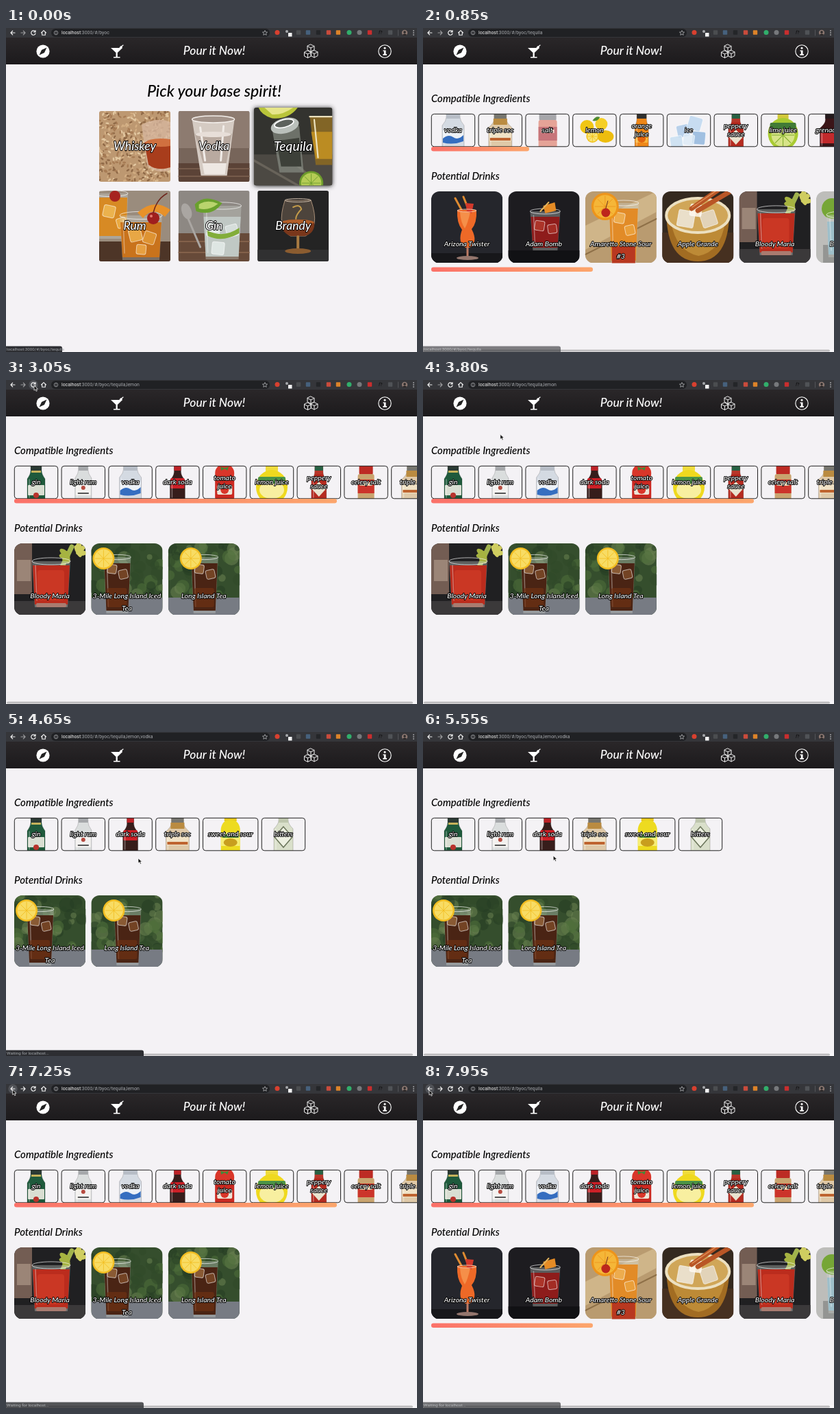
An HTML page for the animation above (8 s loop, 600 px wide and 472 px high).

```html
<!DOCTYPE html>
<html lang="en">
<head>
<meta charset="utf-8">
<title>Cocktail picker</title>
<style>
  html, body { margin: 0; width: 100%; height: 100%; overflow: hidden; background: #f4f2f5; }
  svg { display: block; }
  #stage { width: 100vw; height: 100vh; }
  .script { font-family: Lato, sans-serif; font-style: italic; font-weight: 500; }
  .label { fill: #fff; stroke: #000; stroke-width: 1.8px; paint-order: stroke; stroke-linejoin: round; text-anchor: middle; }
  .ui { font-family: Roboto, sans-serif; }
</style>
</head>
<body>
<svg id="stage" viewBox="0 0 600 472" preserveAspectRatio="none"></svg>
<script>
const LOOP = 8000;
let seed = 7;
const rnd = (a = 0, b = 1) => {
  seed = (seed * 16807) % 2147483647;
  return a + (b - a) * seed / 2147483647;
};
const many = (n, make) => Array.from({ length: n }, (_, i) => make(i)).join('');

// Drawing helpers
const rect = (x, y, w, h, fill, r = 0, more = '') => `<rect x="${x}" y="${y}" width="${w}" height="${h}" rx="${r}" fill="${fill}" ${more}/>`;
const disc = (x, y, r, fill, more = '') => `<circle cx="${x}" cy="${y}" r="${r}" fill="${fill}" ${more}/>`;
const oval = (x, y, rx, ry, fill, more = '') => `<ellipse cx="${x}" cy="${y}" rx="${rx}" ry="${ry}" fill="${fill}" ${more}/>`;
const path = (d, fill, more = '') => `<path d="${d}" fill="${fill}" ${more}/>`;
const line = (d, color, w = 1, more = '') => path(d, 'none', `stroke="${color}" stroke-width="${w}" stroke-linecap="round" stroke-linejoin="round" ${more}`);
const text = (x, y, size, str, cls, more = '') => `<text x="${x}" y="${y}" font-size="${size}" class="${cls}" ${more}>${str}</text>`;
const move = (x, y, inner, more = '') => `<g transform="translate(${x} ${y}) ${more}">${inner}</g>`;
const group = (id, inner) => `<g id="${id}">${inner}</g>`;
const grad = (id, a, b, horizontal) => `<linearGradient id="${id}" x2="${horizontal ? 1 : 0}" y2="${horizontal ? 0 : 1}"><stop stop-color="${a}"/><stop offset="1" stop-color="${b}"/></linearGradient>`;
const clip = (id, w, h, r) => `<clipPath id="${id}">${rect(0, 0, w, h, '#000', r)}</clipPath>`;

const citrus = (x, y, r, rind, flesh) => disc(x, y, r, rind) + disc(x, y, r * .84, flesh) +
  many(4, i => line(`M${x - r * .75} ${y}h${r * 1.5}`, rind, .8, `transform="rotate(${i * 45} ${x} ${y})"`));
const cube = (x, y, s, fill, turn = 0) => rect(x, y, s, s, fill, 2.5, `transform="rotate(${turn} ${x} ${y})" stroke="#ffffff" stroke-opacity=".6" fill-opacity=".8"`);
const tumbler = (x, y, w, h, fill, level = 10, inset = 3) =>
  path(`M${x} ${y}h${w}l${-inset} ${h}h${2 * inset - w}z`, '#cfd3cf', 'fill-opacity=".35"') +
  path(`M${x + 1} ${y + level}h${w - 2}l${1 - inset} ${h - level - 4}h${2 * inset - w}z`, fill) +
  oval(x + w / 2, y, w / 2, w / 11, 'none', 'stroke="#fff" stroke-opacity=".65"') +
  line(`M${x + 5} ${y + 6}l2 ${h - 16}`, '#fff', 1.5, 'stroke-opacity=".35"');

// Base spirits, 104 x 103
const spirits = {
  Whiskey: () => rect(0, 0, 104, 104, '#bd9871') +
    many(430, () => {
      const x = rnd(0, 104), y = rnd(0, 104);
      return oval(x, y, 2.6, 1.3, ['#e2c7a0', '#a77c55', '#d2ad82', '#8f6947'][Math.floor(rnd(0, 4))], `transform="rotate(${rnd(0, 180)} ${x} ${y})"`);
    }) +
    path('M62 20Q84 8 104 16V86Q84 92 70 80Z', '#d9b9a2', 'fill-opacity=".75"') +
    path('M66 46Q86 38 104 46V82Q84 88 72 78Z', '#a83d1c') + oval(90, 46, 22, 6, '#d0703f'),
  Vodka: () => rect(0, 0, 104, 104, '#77655a') + rect(0, 0, 104, 54, '#8d7b70') + rect(0, 76, 104, 28, '#5b4337') +
    line('M0 84h104M0 95h104', '#765b4b', 2) +
    path('M20 12H82L71 94H33Z', '#d5cbc3') + path('M24 33H78L70 76H36Z', '#b9aaa0') + path('M35 76H70L68 92H38Z', '#eee8e3') +
    oval(51, 12, 31, 5, '#a3948b', 'stroke="#f4efeb" stroke-width="1.5"') + line('M32 24l7 48M66 22l-4 50', '#f1ece8', 3) + oval(51, 34, 26, 4, '#e7ded8'),
  Tequila: () => rect(0, 0, 104, 104, '#33332f') + rect(0, 62, 104, 42, '#4c4943') + line('M0 70L60 104M40 62l50 42', '#68635a', 3) +
    path('M6 0H58Q46 16 24 14Q10 10 6 0Z', '#b9c43a') + path('M14 0H52Q38 10 24 9Z', '#e6e58a') +
    path('M24 28L60 24L66 86H34Z', '#8d9289', 'fill-opacity=".65"') + path('M30 44L60 40L63 78H36Z', '#3d4039') +
    oval(41, 24, 19, 10, '#bac0bb', 'transform="rotate(-14 41 24)"') + oval(40, 21, 13, 5, '#5d625d', 'stroke="#fff" stroke-width="1.5" transform="rotate(-14 40 21)"') +
    path('M74 12H104V76H82Z', '#826526') + path('M76 32H104V68H82Z', '#bb8c22') + line('M74 12H104M80 16l5 50', '#ece2bf', 2) +
    citrus(76, 100, 16, '#6d9b2c', '#b5cc55'),
  Rum: () => rect(0, 0, 104, 104, '#9a8c7d') + rect(0, 74, 104, 30, '#4d3527') +
    tumbler(-8, 4, 50, 66, '#d78a24', 6, 2) + cube(8, 20, 17, '#f0bd58', 12) + cube(24, 42, 14, '#efb246', -16) +
    tumbler(30, 36, 62, 65, '#c9731c', 10, 4) + cube(42, 58, 18, '#f1b44f', -14) + cube(68, 58, 17, '#e49b37', 18) + cube(55, 78, 14, '#efac4a', 5) +
    path('M56 32Q80 10 104 28L96 38Q78 22 64 40Z', '#e89129') + disc(23, 8, 8, '#a62320') + disc(79, 40, 9, '#9f1f1e') + line('M79 32Q84 12 99 4', '#6f251d', 1.5) + disc(76, 37, 2, '#e57b6e'),
  Gin: () => rect(0, 0, 104, 104, '#8d8883') + rect(0, 62, 104, 42, '#674a39') + line('M0 74h104M0 90h104', '#83614a', 2) +
    oval(12, 30, 7, 12, '#aaa6a2', 'transform="rotate(-20 12 30)"') + line('M14 40L32 82', '#aaa6a2', 3) +
    tumbler(36, 22, 56, 78, '#c0c8c4', 16, 4) + cube(44, 48, 18, '#eef3f1', 10) + cube(68, 52, 17, '#dce4e1', -14) + cube(50, 74, 18, '#e7eeeb', 6) +
    path('M24 20Q38 4 64 18Q50 38 26 30Z', '#69a02d') + path('M30 20Q42 12 58 19Q44 30 30 26Z', '#b9d46d') + path('M42 58Q66 70 89 54V62Q64 76 43 66Z', '#82ad3a'),
  Brandy: () => rect(0, 0, 104, 104, '#242424') + rect(0, 86, 104, 18, '#303031') +
    path('M40 14H78Q92 54 70 66H48Q27 54 40 14Z', '#85705d', 'fill-opacity=".42" stroke="#a68d76"') +
    path('M34 46H83Q84 62 69 66H48Q34 60 34 46Z', '#79371b') + oval(58.5, 46, 24, 4, '#b05e2a') +
    line('M59 67V84', '#a97b42', 4) + oval(59, 88, 19, 4, '#8b5c30') + oval(59, 14, 19, 2.5, 'none', 'stroke="#c6b5a4"') + line('M52 24q10-5 12 3q-8 8-8 14', '#c29a4a', 2),
};

// Ingredients, 64 x 48
const bottle = (neck, body, shoulder, fill, cap = '', label = '', labelY = 28) =>
  path(`M${32 - neck} -2H${32 + neck}V${shoulder - 8}Q${32 + neck} ${shoulder - 3} ${32 + body} ${shoulder + 4}V50H${32 - body}V${shoulder + 4}Q${32 - neck} ${shoulder - 3} ${32 - neck} ${shoulder - 8}Z`, fill, 'stroke="#000" stroke-opacity=".18"') +
  (cap && rect(32 - neck, 0, neck * 2, 7, cap)) + (label && rect(33 - body, labelY, body * 2 - 2, 15, label, 1)) +
  line(`M${35 - body} ${shoulder + 5}V46`, '#fff', 1.5, 'stroke-opacity=".35"');
const goods = {
  'vodka': () => bottle(10, 16, 13, '#d4dae2', '#b7bdc6', '#edf1f6', 24) + path('M17 36q8-7 15-2t15-3v9q-15 6-30 2z', '#356ec0'),
  'triple sec': () => bottle(9, 17, 16, '#dfc9a8', '#77766f', '#f0e2c6', 25) + rect(22, 7, 20, 9, '#ba8b41') + rect(17, 35, 30, 4, '#be6430'),
  'salt': () => rect(20, -2, 25, 12, '#a6a6aa', 2) + rect(19, 9, 27, 42, '#e5a397', 3) + rect(19, 19, 27, 20, '#c7757a') + rect(23, 23, 19, 5, '#f3d7cd'),
  'lemon': () => disc(21, 19, 10, '#f0c615') + disc(42, 15, 9, '#f5cf26') + oval(48, 33, 12, 9, '#edbd0e') + citrus(29, 33, 9, '#f1bf12', '#f8e478') + path('M29 10q5-8 11-5q-4 7-11 5', '#4e8a31'),
  'orange juice': () => bottle(7, 10, 15, '#ef8718', '#303030', '#f7b33a', 27) + disc(32, 36, 6, '#e2650f'),
  'ice': () => cube(13, 18, 18, '#a9c9e8', -12) + cube(34, 2, 20, '#bcd8f0', 16) + cube(38, 25, 19, '#8db5dc', 5) + cube(4, 34, 18, '#c6dff2', -8) + cube(25, 29, 16, '#dcebf7', 8),
  'peppery sauce': () => bottle(6, 11, 17, '#b52b20', '#286143') + rect(26, 7, 12, 5, '#b7372a') + path('M32 23l10 11-10 11-10-11z', '#e9e3cf'),
  'lime juice': () => rect(24, -2, 16, 11, '#d2c83a', 2) + oval(32, 29, 22, 23, '#a9cb32') + disc(32, 31, 17, '#d7e488') + many(4, i => line('M16 31h32', '#7fab28', 1, `transform="rotate(${i * 45} 32 31)"`)) + rect(13, 13, 38, 9, '#417b36', 2),
  'grenadine': () => bottle(7, 15, 17, '#3b1518', '#241a1d', '#c22a2c'),
  'gin': () => bottle(8, 13, 15, '#1f5a3c', '#2b3a34', '#d9ded2', 28) + disc(32, 43, 4, '#b8332c') + rect(25, 7, 14, 3, '#c5b25b'),
  'light rum': () => bottle(7, 12, 14, '#dadddd', '#a6a8ab', '#f3f1ef', 28) + disc(32, 32, 3, '#b64a3f') + rect(24, 39, 16, 2, '#555'),
  'dark soda': () => bottle(5, 11, 17, '#371d1b', '#bc2227', '#cc2027', 18),
  'tomato juice': () => oval(32, 11, 14, 14, '#d9362a') + rect(18, 17, 28, 34, '#cb2a22', 5) + rect(21, 28, 22, 14, '#ece4d6', 2) + disc(32, 35, 6, '#d9362a') + path('M26 1q6 4 12 0l-2 6-4-3-5 3z', '#428a38'),
  'lemon juice': () => rect(23, -2, 18, 11, '#f0dc3c', 2) + oval(32, 31, 23, 25, '#efd91f') + oval(32, 35, 18, 13, '#f8efa0') + rect(12, 16, 40, 10, '#4c9347', 2),
  'celery salt': () => rect(22, -2, 20, 15, '#bd2b24', 2) + rect(20, 12, 24, 40, '#c9a46f', 3) + rect(20, 20, 24, 20, '#cc342b') + rect(23, 24, 18, 5, '#f3e2c0'),
  'sweet and sour': () => move(8.5, 0, rect(23, -2, 18, 7, '#e8c91d') + path('M18 52V16Q20 3 32 3T46 16V52Z', '#eddb20') + rect(18, 21, 28, 20, '#f6ed74') + oval(32, 36, 10, 6, '#c89e1e') + rect(20, 24, 24, 5, '#4b8c3f')),
  'bitters': () => bottle(7, 14, 12, '#d9dfca', '#bec6ad') + path('M32 13l13 15-13 15-13-15z', '#edf0e1', 'stroke="#6c765c" stroke-width="1.5"'),
};

// Drinks, 104 x 104
const icedTea = shift => rect(0, 0, 104, 104, '#354e2d') +
  many(45, () => disc(rnd(0, 104), rnd(0, 80), rnd(4, 11), ['#4f6f3b', '#263c24', '#6a8150', '#314929'][Math.floor(rnd(0, 4))], 'fill-opacity=".55"')) +
  rect(0, 79, 104, 25, '#777b83') +
  move(shift, 0, tumbler(18, 20, 40, 82, '#4a2414', 9, 4) + cube(25, 30, 13, '#99683d', 8) + cube(39, 40, 13, '#7d4b28', -12) + rect(23, 65, 29, 28, '#6e3113', 3, 'fill-opacity=".7"') + citrus(18, 22, 16, '#f2bd20', '#f8dc64'));
const drinks = {
  'Arizona Twister': () => rect(0, 0, 104, 104, '#25262c') + rect(0, 90, 104, 14, '#17171a') +
    line('M47 32L35 10M56 30L47 8', '#df8b31', 3) + path('M38 27H66Q67 46 59 55Q69 74 56 82H50Q38 74 45 56Q37 46 38 27Z', '#ee6927') + path('M42 30H57Q53 48 49 54Q43 45 42 30Z', '#f58f49') +
    line('M53 82V94', '#bd7b64', 3) + oval(53, 97, 16, 3, '#94766d') + path('M50 17l12 1-3 14-7-3z', '#d3382b') + oval(52, 28, 14, 2, 'none', 'stroke="#f5bfa2"'),
  'Adam Bomb': () => rect(0, 0, 104, 104, '#1d1c20') + rect(0, 86, 104, 18, '#111114') +
    tumbler(32, 29, 44, 57, '#8e1c1b', 8, 4) + cube(40, 42, 14, '#b43a2d', 9) + cube(57, 49, 13, '#a93027', -8) + path('M51 21l17-5 2 12-16 4z', '#e58b25') + line('M47 29l12-13', '#e4b45b', 2),
  'Amaretto Stone Sour|#3': () => rect(0, 0, 104, 104, '#b99b70') + path('M0 50L104 0V30L0 85Z', '#cfb589') + line('M0 92L104 40', '#8e7048', 2) +
    tumbler(34, 17, 44, 88, '#e28b27', 8, 4) + cube(44, 30, 15, '#f1b458', 10) + cube(57, 51, 14, '#eda43f', -12) + rect(39, 80, 34, 25, '#b83820') +
    citrus(29, 22, 20, '#ed941b', '#f5b638') + disc(30, 31, 6.5, '#bd261c') + line('M30 25l3-11', '#6b2d20'),
  'Apple Grande': () => rect(0, 0, 104, 104, '#34291f') + rect(0, 60, 104, 44, '#463020') +
    path('M6 34Q8 102 52 102T98 34Z', '#a26c22') + path('M13 45H92Q85 88 53 94Q20 87 13 45Z', '#bd8a36') + oval(52, 35, 46, 25, '#d0a658', 'stroke="#ece0c1" stroke-width="4"') +
    cube(25, 26, 24, '#f2eee6', 10) + cube(54, 33, 22, '#e8dfd1', -18) + cube(42, 18, 17, '#fffaf2', 8) + line('M43 25L83 -3M52 28L101 -1', '#b95626', 7) + line('M44 23L82 -3', '#de8c52', 1.5),
  'Bloody Maria': () => rect(0, 0, 104, 104, '#202022') + rect(0, 0, 26, 74, '#735d53') + rect(4, 24, 20, 31, '#9b8577') + rect(0, 84, 104, 20, '#3b393a') +
    line('M70 34L84 5', '#a1b34d', 7) + many(9, i => oval(85 + 13 * Math.cos(i * 2.4), 14 + 10 * Math.sin(i * 2.4), 8, 4, i % 2 ? '#a6b341' : '#cfcd60', `transform="rotate(${i * 37} 85 14)"`)) +
    tumbler(26, 26, 56, 67, '#bb2c1d', 6, 4) + rect(34, 39, 39, 44, '#d7412a', 4, 'fill-opacity=".55"') + rect(32, 87, 44, 6, '#a97b70', 2),
  'Blue Margarita': () => rect(0, 0, 104, 104, '#bdbdba') + disc(23, 25, 15, '#76a636') + rect(10, 78, 94, 26, '#949593') + tumbler(15, 34, 60, 62, '#9ebfca'),
  '3-Mile Long Island Iced|Tea': () => icedTea(0),
  'Long Island Tea': () => icedTea(15),
};

// Tiles and pages
const caption = (x, y, size, gap, str) => {
  const rows = str.split('|');
  return rows.map((row, i) => text(x, y + i * gap, size, row, 'script label')).join('');
};
const spiritTile = (name, i) => {
  const hot = i === 2;
  const art = `<g clip-path="url(#spirit)">${spirits[name]()}</g>` + caption(52, 57, 17.5, 0, name);
  const x = 136 + (i % 3) * 115.6, y = 121 + Math.floor(i / 3) * 116;
  return hot
    ? move(362, 116, rect(0, 0, 104, 104, '#333', 3, 'filter="url(#soft)"') + art, 'scale(1.1)')
    : move(x, y, art);
};
const ingredientRow = (id, names, bar) => {
  let x = 12;
  return group(id, names.map(name => {
    const w = name === 'sweet and sour' ? 81 : 64;
    const rows = /(juice|sauce)$/.test(name) && name.length > 10 && name !== 'lemon juice' ? name.replace(' ', '|') : name;
    const tile = move(x, 125, `<g clip-path="url(#${w > 64 ? 'wide' : 'item'})">${goods[name]()}</g>` +
      rect(.3, .3, w - .6, 47.5, 'none', 4, 'stroke="#222" stroke-width="1"') +
      caption(w / 2, rows.includes('|') ? 20.5 : 27, 10.4, 12.5, rows));
    x += w + 4.8;
    return tile;
  }).join('') + (bar ? rect(12, 173, bar - 12, 6.6, 'url(#warm)', 3.3) : ''));
};
const drinkRow = (id, names, bar) => group(id, names.map((name, i) =>
  move(12 + i * 112.4, 238, `<g clip-path="url(#drink)">${drinks[name]()}</g>` + caption(52, 80, 10.4, 18, name))).join('') +
  (bar ? rect(12, 348.5, bar - 12, 6.6, 'url(#warm)', 3.3) : ''));

const rowB = ['gin', 'light rum', 'vodka', 'dark soda', 'tomato juice', 'lemon juice', 'peppery sauce', 'celery salt', 'triple sec'];
const pages =
  group('home', text(304, 100, 23, 'Pick your base spirit!', 'script', 'text-anchor="middle"') + Object.keys(spirits).map(spiritTile).join('')) +
  group('results', text(12, 108, 15, 'Compatible Ingredients', 'script') + text(12, 221, 15, 'Potential Drinks', 'script') +
    ingredientRow('items-a', ['vodka', 'triple sec', 'salt', 'lemon', 'orange juice', 'ice', 'peppery sauce', 'lime juice', 'grenadine'], 155) +
    ingredientRow('items-b', rowB, 483) +
    ingredientRow('items-c', ['gin', 'light rum', 'dark soda', 'triple sec', 'sweet and sour', 'bitters']) +
    drinkRow('drinks-a', ['Arizona Twister', 'Adam Bomb', 'Amaretto Stone Sour|#3', 'Apple Grande', 'Bloody Maria', 'Blue Margarita'], 248) +
    drinkRow('drinks-b', ['Bloody Maria', '3-Mile Long Island Iced|Tea', 'Long Island Tea']) +
    drinkRow('drinks-c', ['3-Mile Long Island Iced|Tea', 'Long Island Tea']) +
    rect(0, 467.5, 600, 4.5, '#f7f6f8') + rect(1, 468.4, 593, 3.2, '#bdbcbe', 1.6));

const ice = (x, y) => move(x, y, line('M0-5L5-2.5V3L0 5.5L-5 3V-2.5ZM-5-2.5L0 0L5-2.5M0 0V5.5', '#eee', 1));
const nav = rect(0, 14, 600, 39, 'url(#nav)') +
  disc(54, 34, 9.6, '#fff') + path('M59.5 28.5L56 36L48.5 39.5L52 32Z', '#222') +
  path('M153 29H170L162.8 36V42H166.5V43.5H157V42H160.5V36Z', '#fff') + line('M161 33L171 25', '#fff', 1.2) + disc(168, 28, 1.8, '#fff') +
  text(304, 39, 17.5, 'Pour it Now!', 'script', 'text-anchor="middle" fill="#fff"') +
  ice(445, 29) + ice(440.5, 38) + ice(450, 37.5) +
  disc(553, 34, 9.2, 'none', 'stroke="#fff" stroke-width="1.1"') + disc(553, 29.3, 1.5, '#fff') + path('M550.5 32.5H554.5V38H556V39.8H550.2V38H551.8V34H550.5Z', '#fff');

const plugins = [[396, '#d8402f', 1], [427, '#4b4d50'], [441, '#46617d'], [456, '#242629'], [471, '#c94b3c'], [485, '#dc8329'], [501, '#31ae6b', 1], [516, '#77797c', 1], [531, '#c92e2e'], [561, '#505357']];
const toolbar = rect(0, 0, 600, 14, '#35363a') + disc(0, 7, 6.7, '#505257', 'id="hover"') +
  line('M13 7H7M9.7 4.2L7 7L9.7 9.8', '#f1f1f1', 1.2) + line('M22 7H28M25.3 4.2L28 7L25.3 9.8', '#f1f1f1', 1.2, 'id="forward"') +
  line('M42.4 5A3.2 3.2 0 1 0 43 8M43 3.5V6H40.5', '#f1f1f1', 1.2) + line('M51.5 7L55 3.6L58.5 7M52.7 6.5V10.2H57.3V6.5', '#f1f1f1', 1.1) +
  rect(66, 1, 319, 12, '#202124', 6) + disc(73, 7, 2.8, 'none', 'stroke="#a6a8ab" stroke-width=".8"') + line('M73 6.8V8.4M73 5.5V5.6', '#a6a8ab', .8) +
  `<text x="81" y="9.3" font-size="6.9" class="ui" fill="#a5a8ac"><tspan fill="#f2f2f2">localhost</tspan><tspan id="url"></tspan></text>` +
  path('M378 3.5l1 2.4 2.6.2-2 1.7.6 2.5-2.2-1.3-2.2 1.3.6-2.5-2-1.7 2.6-.2z', 'none', 'stroke="#c3c5c8" stroke-width=".7"') +
  plugins.map(([x, fill, round]) => round ? disc(x, 6.5, 3.5, fill) : rect(x - 3.2, 3.3, 6.4, 6.4, fill, .7)).join('') +
  disc(410, 5, 2, '#a7a9ac') + rect(412, 7, 5.5, 5.5, '#f3f3f3', .5) + text(544, 9, 6.5, 'f?', 'ui', 'fill="#0b0b0c" font-style="italic"') +
  line('M572.5 3V11', '#606267', .7) + disc(582, 7, 4.2, '#8b7770') + disc(582, 6, 1.8, '#292728') + path('M578.8 10Q582 6.5 585.2 10Q582 12.6 578.8 10Z', '#292728') +
  [4, 7, 10].map(y => disc(595, y, .8, '#e3e4e5')).join('');

const status = group('status', rect(-4, 463.5, 205, 13, '#2d2e32', 3, 'id="bubble"') + text(1, 470.2, 6.2, '', 'ui', 'id="message" fill="#a2a6aa"'));
const cursor = group('cursor',
  path('M0 0V7.2L1.8 5.6L3 8.4L4.4 7.8L3.2 5.1H5.5Z', '#111', 'id="arrow" stroke="#fff" stroke-width=".7"') +
  path('M1 1Q2-.5 2.8 1L3.4 4L6.6 4.8Q7.6 5.2 7 7L6.2 9H2.6L.2 6Q0 4.8 1.8 5.4Z', '#fff', 'id="hand" stroke="#111" stroke-width=".8"'));

const stage = document.getElementById('stage');
stage.innerHTML = `<defs>${grad('nav', '#2a2729', '#1c1a1c')}${grad('warm', '#fb7169', '#fca66c', true)}
  ${clip('spirit', 104, 103, 3)}${clip('item', 64, 48, 4)}${clip('wide', 81, 48, 4)}${clip('drink', 104.5, 104.5, 12)}
  <filter id="soft" x="-20%" y="-20%" width="140%" height="140%"><feGaussianBlur stdDeviation="3"/></filter></defs>` +
  rect(0, 0, 600, 472, '#f4f2f5') + pages + nav + toolbar + status + cursor;

// [start, ingredients, drinks, address]
const views = [
  [0, '', '', ''],
  [450, 'a', 'a', '/tequila'],
  [1250, 'b', 'b', '/tequila,lemon'],
  [4400, 'c', 'c', '/tequila,lemon,vodka'],
  [7100, 'b', 'b', '/tequila,lemon'],
  [7850, 'b', 'a', '/tequila'],
];
const link = 'localhost:3000/#/byoc/tequila', wait = 'Waiting for localhost...';
// [start, end, message, width, opacity at start, opacity at end]
const notices = [
  [0, 600, link, 82, 1, 1], [600, 800, link, 201, 1, .8], [800, 950, link, 201, .8, .2],
  [1250, 1450, wait, 201, .8, .8], [3150, 3350, wait, 201, .8, .8],
  [4450, 4800, wait, 201, 1, 1], [7150, 7400, wait, 201, .8, .8], [7880, 8000, wait, 201, .65, .65],
];
// [time, x, y]
const track = [[1000, 262, 154], [1250, 250, 150], [1550, 228, 139], [1800, 225, 138], [2500, 60, 12], [3050, 41, 8], [3400, 42, 8], [4200, 183, 150], [4400, 183, 152], [4650, 193, 184], [5700, 190, 180], [6450, 35, 5], [6750, 10, 8], [7950, 9, 9]];

const el = id => document.getElementById(id);
const show = (id, on) => { el(id).style.display = on ? '' : 'none'; };
const ease = p => p * p * (3 - 2 * p);

function pointerAt(t) {
  const next = track.findIndex(k => k[0] > t);
  if (next < 1) return track[next < 0 ? track.length - 1 : 0].slice(1);
  const [t0, x0, y0] = track[next - 1], [t1, x1, y1] = track[next];
  const p = ease((t - t0) / (t1 - t0));
  return [x0 + (x1 - x0) * p, y0 + (y1 - y0) * p];
}

function draw(t) {
  const [, items, mix, address] = views.filter(v => v[0] <= t).pop();
  show('home', !items);
  show('results', items);
  for (const key of 'abc') {
    show('items-' + key, items === key);
    show('drinks-' + key, mix === key);
  }
  el('url').textContent = ':3000/#/byoc' + address;
  el('forward').setAttribute('opacity', t >= 7100 ? 1 : .55);

  const notice = notices.find(n => t >= n[0] && t < n[1]);
  show('status', notice);
  if (notice) {
    const [start, end, message, width, from, to] = notice;
    el('message').textContent = message;
    el('bubble').setAttribute('width', width + 4);
    el('status').setAttribute('opacity', from + (to - from) * (t - start) / (end - start));
  }

  const [x, y] = pointerAt(t);
  const hand = y > 125 && y < 173;
  show('cursor', t >= 1000);
  show('hand', hand);
  show('arrow', !hand);
  el('cursor').setAttribute('transform', `translate(${x} ${y})`);
  const button = [10, 25, 40, 55].find(cx => Math.abs(x - cx) < 7);
  show('hover', t >= 1000 && y < 14 && button);
  if (button) el('hover').setAttribute('cx', button);
}

const tick = () => {
  draw(performance.now() % LOOP);
  requestAnimationFrame(tick);
};
tick();
</script>
</body>
</html>
```
